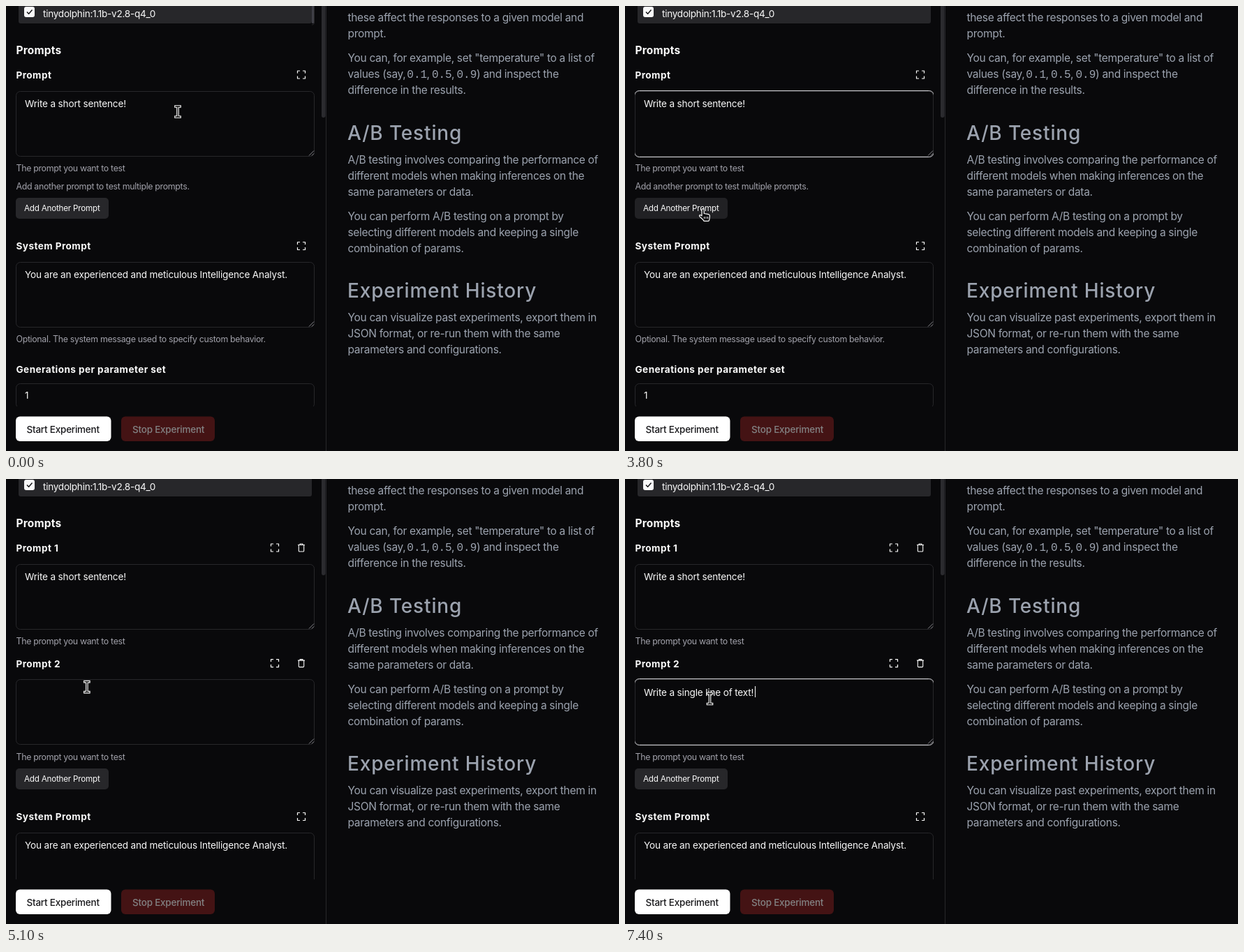
An HTML page that plays this animation: 878 px wide and 638 px high, repeating every 8 s.

```html
<!DOCTYPE html>
<html lang="en">
<head>
<meta charset="utf-8">
<title>Prompt form</title>
<style>
  html, body { margin: 0; width: 100%; height: 100%; overflow: hidden; background: #09090b; }
  svg { display: block; }
  text { font-family: Inter, "Open Sans", sans-serif; font-size: 13.6px; letter-spacing: -.02em; fill: #fafafa; white-space: pre; }
  .field { letter-spacing: -.013em; }
  .section { font-size: 15.5px; font-weight: 700; letter-spacing: .01em; }
  .label { font-weight: 700; letter-spacing: .031em; }
  .hint { font-size: 12.4px; letter-spacing: -.027em; fill: #a1a1aa; }
  .small { font-size: 11.7px; letter-spacing: -.02em; }
  .button { font-size: 13.5px; font-weight: 500; letter-spacing: -.017em; }
  .body { font-size: 15.5px; fill: #9ca3af; }
  .heading { font-size: 28px; font-weight: 500; letter-spacing: .03em; fill: #9ca3af; }
  .code { font: 16px "Liberation Mono", monospace; letter-spacing: 0; fill: #9ca3af; }
</style>
</head>
<body>
<svg id="stage" width="878" height="638" viewBox="0 0 878 638">
  <defs>
    <clipPath id="form"><rect x="14" width="428" height="574"/></clipPath>
  </defs>
  <g id="scene"></g>
</svg>
<script>
const DURATION = 8000;
const LINE = '#27272a';
const scene = document.getElementById('scene');

const text = (x, y, content, style = '') => `<text x="${x}" y="${y}" class="${style}">${content}</text>`;
const box = (x, y, w, h, r, fill, extra = '') =>
  `<rect x="${x}" y="${y}" width="${w}" height="${h}" rx="${r}" fill="${fill}" ${extra}/>`;
const outline = (x, y, w, h, r, color) => box(x + .5, y + .5, w - 1, h - 1, r, 'none', `stroke="${color}"`);
const path = (d, color, width = 1, fill = 'none', cap = 'butt') =>
  `<path d="${d}" fill="${fill}" stroke="${color}" stroke-width="${width}" stroke-linejoin="round" stroke-linecap="${cap}"/>`;
const move = (x, y, content) => `<g transform="translate(${x} ${y})">${content}</g>`;

const expandIcon = (x, y) => move(x, y, path(
  'M-5.5-2V-5.5H-2M2-5.5H5.5V-2M5.5 2V5.5H2M-2 5.5H-5.5V2', '#fafafa', 1.2));
const trashIcon = (x, y) => move(x, y, path(
  'M-5-4H5M-2-4V-5.5H2V-4M-3.7-4V4.5Q-3.7 5.5-2.7 5.5H2.7Q3.7 5.5 3.7 4.5V-4', '#fafafa', 1.1));

function beam(x, y) {
  const d = 'M-3-7.5H3M0-7.5V7.5M-3 7.5H3';
  return move(x, y, path(d, '#fff', 3.6, 'none', 'square') + path(d, '#000', 1.3, 'none', 'square'));
}

function hand(x, y) {
  return move(x, y,
    path('M4 11V2.4Q4 .7 5.6 .7T7.2 2.4V7.5L13.5 8.6Q15.5 9 15.4 11L15 15Q14.6 18.4 13.4 18.4H7.2' +
         'C5.5 15.5 3 13.8 1 11.8Q-.2 10.1 1.6 9.6Q3 9.6 4 11Z', '#fff', 1.2, '#09090b') +
    path('M7.5 12V15M10 12V15M12.5 12V15', '#fff', .9));
}

function textarea(y, content, focused, caretX) {
  const top = Math.floor(y);
  return outline(14, top, 428, 94, 6, LINE) +
    (focused ? outline(13, top - 1, 430, 96, 7, '#d4d4d8') : '') +
    path(`M434 ${top + 92.5}l7-7M438 ${top + 92.5}l3-3`, '#8b8b90') +
    text(27, y + 23, content, 'field') +
    (caretX ? box(caretX, top + 10, 1, 16, 0, '#fafafa') : '');
}

function promptField(y, name, removable, ...area) {
  return text(14.5, y - 18, name, 'label') +
    expandIcon(removable ? 385 : 423, y - 23.5) +
    (removable ? trashIcon(423, y - 23.5) : '') +
    textarea(y, ...area) +
    text(14.5, y + 115, 'The prompt you want to test', 'hint');
}

function modelList(t) {
  const bar = t < 1500
    ? box(438, -5, 3, 30, 1, '#3f3f46') + path('M441.5 0V24Q441.5 27 438 27', LINE)
    : t < 2000 ? path('M441.5 0V25', LINE) : '';
  return box(18, -10, 420, 35, 3, LINE) + bar + box(26, 1, 15, 15, 3, '#fafafa') +
    path('M30 8.5l2.6 2.8L37.5 5.5', '#18181b', 1.5) +
    text(53, 15.5, 'tinydolphin:1.1b-v2.8-q4_0');
}

function form(t) {
  const two = t >= 4600;
  const hovered = t >= 3200 && t < 5100;
  const firstFocus = t >= 1500 && t < 4400;
  const firstCaret = t >= 1500 && t < 2000 || t >= 3200 && t < 3800;
  const typed = t >= 7400;
  const secondCaret = typed ? 186 : t >= 5600 && t < 6200 || t >= 6900 ? 27 : 0;

  const prompts = promptField(122, two ? 'Prompt 1' : 'Prompt', two,
      'Write a short sentence!', firstFocus, firstCaret && 171) +
    (two
      ? promptField(287.6, 'Prompt 2', true, typed ? 'Write a single line of text!' : '', t >= 5600, secondCaret)
      : text(14.5, 262.5, 'Add another prompt to test multiple prompts.', 'hint'));

  const rest = box(14, 275, 133, 30, 5, hovered ? '#212124' : LINE) +
    text(26, 294, 'Add Another Prompt', 'small') +
    text(14.5, 348.5, 'System Prompt', 'label') + expandIcon(423, 344) +
    textarea(367, 'You are an experienced and meticulous Intelligence Analyst.') +
    text(14.5, 482, 'Optional. The system message used to specify custom behavior.', 'hint') +
    text(14.5, 526, 'Generations per parameter set', 'label') +
    outline(14, 541, 428, 36, 6, LINE) + text(27, 563, '1');

  return `<g clip-path="url(#form)">${modelList(t)}${text(14.5, 69, 'Prompts', 'section')}` +
    `${prompts}${move(0, two ? 140 : 0, rest)}</g>`;
}

function scrollbar(t) {
  const color = t < 2500 || t >= 3200 ? '#2b2b2f' : t < 2600 ? '#242427' : '#1c1c1f';
  return box(452, -10, 5.5, t < 4600 ? 170 : 148, 2.7, color) + box(458, 0, 1, 638, 0, LINE);
}

const footer = box(14, 588.5, 136.5, 35.5, 6, '#fff') +
  `<text x="29.5" y="611.5" class="button" style="fill:#18181b">Start Experiment</text>` +
  `<g opacity=".5">${box(165, 588.5, 134, 35.5, 6, '#7f1d1d')}${text(181, 611.5, 'Stop Experiment', 'button')}</g>`;

const paragraph = (y, ...lines) => lines.map((line, i) => text(489.5, y + i * 23.1, line, 'body')).join('');
const article =
  paragraph(22, 'these affect the responses to a given model and', 'prompt.') +
  paragraph(79.5, 'You can, for example, set "temperature" to a list of', 'values (say,', 'difference in the results.') +
  ['0.1', '0.5', '0.9'].map((n, i) => text(574.3 + i * 35.6, 102.6, n, 'code')).join('') +
  text(602.5, 102.6, ',', 'body') + text(638, 102.6, ',', 'body') +
  text(674, 102.6, ') and inspect the', 'body') +
  text(489, 191.5, 'A/B Testing', 'heading') +
  paragraph(226, 'A/B testing involves comparing the performance of',
    'different models when making inferences on the', 'same parameters or data.') +
  paragraph(306.5, 'You can perform A/B testing on a prompt by',
    'selecting different models and keeping a single', 'combination of params.') +
  text(489, 417.5, 'Experiment History', 'heading') +
  paragraph(452, 'You can visualize past experiments, export them in',
    'JSON format, or re-run them with the same', 'parameters and configurations.');

function pointer(t) {
  if (t < 2500) return beam(246, 151.5);
  if (t < 2600) return beam(235, 164);
  if (t < 3200) return beam(232, 168);
  if (t < 5000) return hand(t < 3800 ? 104.5 : t < 3900 ? 106 : 107, 290);
  // The pointer is sampled every 100 ms on its way into the second field.
  const step = Math.min(4, Math.floor((t - 5000) / 100)) / 4;
  return beam(114 + 7.5 * step, 293 + 20.5 * step + (t >= 5800 ? 1.5 : 0));
}

let shown = '';
function frame() {
  const t = performance.now() % DURATION;
  const markup = form(t) + scrollbar(t) + footer + article + pointer(t);
  if (markup !== shown) scene.innerHTML = shown = markup;
  requestAnimationFrame(frame);
}
frame();
</script>
</body>
</html>
```
